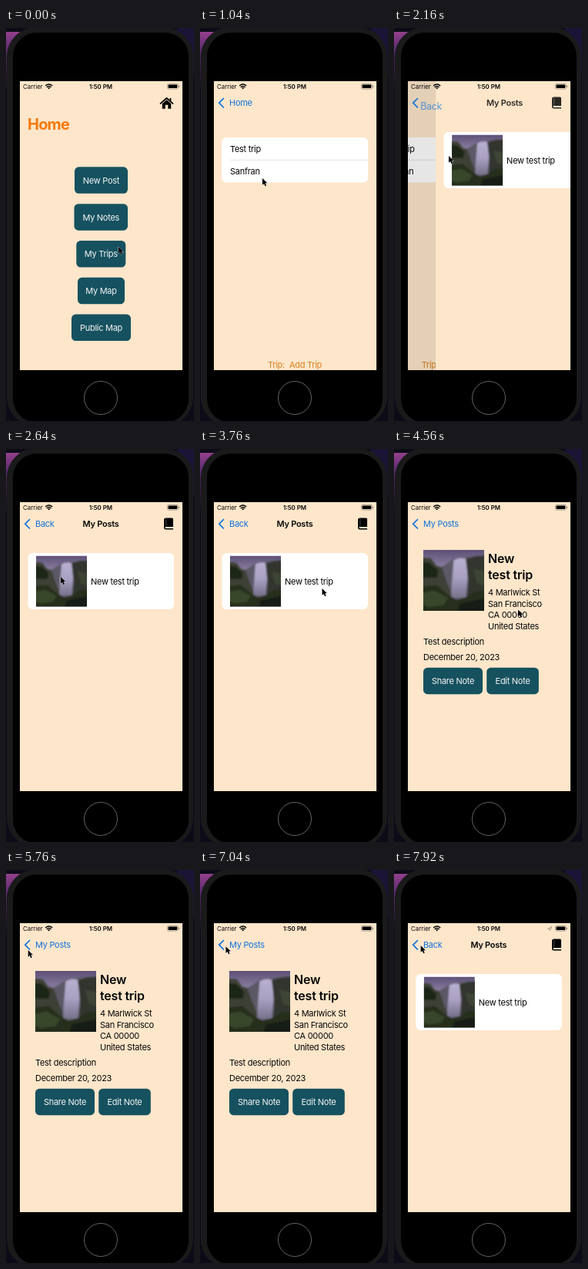
These frames come from a looping animation (244 by 510 pixels, 8 s). An HTML page:

```html
<!DOCTYPE html>
<html lang="en">
<head>
<meta charset="utf-8">
<title>Travel notes</title>
<style>
html, body { margin: 0; width: 100%; height: 100%; overflow: hidden; background: #0d0b18; }
svg { display: block; width: 100%; height: 100%; }
text { font: 11px Inter, "Liberation Sans", sans-serif; letter-spacing: -.28px; fill: #060606; }
.mid { text-anchor: middle; }
.blue { fill: #1172de; }
.amber { fill: #d9821f; }
.white { fill: #f4f6f6; }
.large { font-size: 20px; font-weight: 700; letter-spacing: -.8px; fill: #f57a0b; }
.head { font-size: 16px; font-weight: 600; letter-spacing: -.2px; }
.title { font-weight: 600; text-anchor: middle; }
.status { font-size: 7.9px; letter-spacing: 0; }
.bold { font-weight: 600; }
.card { fill: #fff; }
.bg { fill: #fde6ca; }
</style>
</head>
<body>
<svg viewBox="0 0 244 510">
  <defs>
    <clipPath id="screen"><rect x="18" y="69" width="211" height="375"/></clipPath>
    <linearGradient id="glow" x2="0" y2="1">
      <stop offset="0" stop-color="#94408c"/><stop offset=".3" stop-color="#5c2c70"/><stop offset="1" stop-color="#120e20"/>
    </linearGradient>
    <linearGradient id="sky" x2="0" y2="1">
      <stop offset="0" stop-color="#5d5077"/><stop offset=".25" stop-color="#85799b"/><stop offset=".7" stop-color="#6f6a7d"/><stop offset="1" stop-color="#3a3d35"/>
    </linearGradient>
    <linearGradient id="falls" x2="0" y2="1">
      <stop offset="0" stop-color="#b9b0d0"/><stop offset=".5" stop-color="#a9a0c2"/><stop offset="1" stop-color="#77718a"/>
    </linearGradient>
    <filter id="soft"><feGaussianBlur stdDeviation="1.1"/></filter>
    <symbol id="photo" viewBox="0 0 66 66">
      <rect width="66" height="66" fill="url(#sky)"/>
      <g filter="url(#soft)">
        <path d="M17 20L27 14L34 9L70 5V70H17Z" fill="#5c5866"/>
        <path d="M-4 8L8 9L14 17L20 19L25 34L31 48L34 70H-4Z" fill="#3c4135"/>
        <path d="M-4 13L7 14L16 22L15 30L-4 30Z" fill="#1f2519"/>
        <path d="M33 11Q40 7 47 10L48 30L46 52H30L31 36Z" fill="url(#falls)"/>
        <path d="M46 10L56 7L70 6V70H46L49 34Z" fill="#31342e"/>
        <path d="M54 20L70 24V40L58 36Z" fill="#3d4534"/>
        <path d="M-4 40L14 38L26 48L36 54L47 51L56 45L70 44V70H-4Z" fill="#252d1b"/>
        <path d="M-4 47L12 44L27 52L22 60L6 62L-4 58Z" fill="#38462a"/>
        <path d="M40 58L70 52V70H36Z" fill="#181c12"/>
      </g>
    </symbol>
  </defs>

  <rect width="244" height="510" fill="#0d0b18"/>
  <rect y="5" width="20" height="75" fill="url(#glow)"/>
  <rect x="222" width="22" height="60" fill="#1c1436"/>
  <rect x="1" y="-1" width="242" height="518" rx="38" fill="#1a1a1b"/>
  <rect x="9" y="6" width="228" height="506" rx="31"/>
  <circle cx="123" cy="480" r="21.5" fill="none" stroke="#636363"/>

  <g clip-path="url(#screen)">
    <g id="pages">
      <g>
        <rect class="bg" x="18" y="69" width="211" height="375"/>
        <g id="menu"></g>
      </g>
      <g>
        <rect class="bg" x="18" y="69" width="211" height="375"/>
        <rect class="card" x="28" y="142" width="190" height="58.5" rx="6"/>
        <path d="M39 171.3H218" stroke="#dcdcdc" stroke-width=".8"/>
        <text x="39" y="161">Test trip</text>
        <text x="39" y="190">Sanfran</text>
        <text class="amber" x="88" y="441">Trip:</text>
        <text class="amber" x="116" y="441">Add Trip</text>
      </g>
      <g>
        <rect class="bg" x="18" y="69" width="211" height="375"/>
        <rect class="card" x="28.5" y="135" width="189.5" height="73" rx="6"/>
        <use href="#photo" x="39" y="138.5" width="66" height="66"/>
        <text x="110" y="175.5">New test trip</text>
      </g>
      <g>
        <rect class="bg" x="18" y="69" width="211" height="375"/>
        <use href="#photo" x="38" y="131" width="79" height="79"/>
        <text class="head" x="122" y="148">New</text>
        <text class="head" x="122" y="169">test trip</text>
        <text x="122" y="190.3">4 Marlwick St</text>
        <text x="122" y="205">San Francisco</text>
        <text x="122" y="219.4">CA 00000</text>
        <text x="122" y="234">United States</text>
        <text x="38" y="254">Test description</text>
        <text x="38" y="274">December 20, 2023</text>
        <g id="actions"></g>
      </g>
    </g>

    <path id="chevron" d="M30.5 91.5L24.8 97.2L30.5 103" fill="none" stroke="#1172de" stroke-width="1.7" stroke-linecap="round" stroke-linejoin="round"/>
    <text id="homeLarge" class="large">Home</text>
    <text id="homeLabel" class="blue">Home</text>
    <text id="backLabel" class="blue">Back</text>
    <text id="postsTitle" class="title">My Posts</text>
    <text id="postsLabel" class="blue">My Posts</text>
    <g id="house">
      <path d="M200.5 98L208.5 91L216.5 98" fill="none" stroke="#000" stroke-width="1.7" stroke-linecap="round" stroke-linejoin="round"/>
      <path d="M202.8 98.3L208.5 93.3L214.2 98.3V104.8H210.3V99.8H206.7V104.8H202.8ZM212.5 91H214.3V95L212.5 93.5Z"/>
    </g>
    <g id="book">
      <path d="M207.5 89.5H215.5Q217 89.5 217 91V101H207.5Q206.5 101 206.5 102T207.5 103H217V104.5H207.5Q205 104.5 205 102V92Q205 89.5 207.5 89.5Z"/>
      <path d="M207.8 90.5V100.5" stroke="#777" stroke-width=".6"/>
    </g>

    <text class="status" x="22" y="79">Carrier</text>
    <text class="status bold mid" x="123" y="79">1:50 PM</text>
    <g fill="none" stroke="#000" stroke-width="1.4">
      <path d="M51.2 75Q55.7 70.8 60.2 75M52.8 76.9Q55.7 74.2 58.6 76.9"/>
      <path d="M54.2 77.7Q55.7 76.5 57.2 77.7L55.7 79.4Z" fill="#000" stroke="none"/>
      <rect x="209.4" y="72.4" width="14" height="6.8" rx="1.8" stroke="#8f8577" stroke-width=".7"/>
      <rect x="210.5" y="73.5" width="11.8" height="4.6" rx="1" fill="#000" stroke="none"/>
      <path d="M224.7 74.7V77" stroke="#8f8577" stroke-width="1"/>
      <path id="locate" d="M199.7 76.2L204.8 73.6L202.4 78.8L202.1 76.5Z" stroke="#8d8377" stroke-width=".7"/>
    </g>
  </g>
  <path id="cursor" d="M0 0V10.2L2.4 8L4.1 11.8L5.9 11L4.3 7.3H7.4Z" stroke="#fff" stroke-width=".8" stroke-linejoin="round" paint-order="stroke"/>
</svg>
<script>
const LOOP = 8000, STEP = 80, WIDTH = 211;
const PUSH = [200, 1960, 3880], POP = 7400;
// time, x, y of the pointer tip
const PATH = [
  [0, 146, 284], [400, 146, 284], [1040, 81, 195], [1360, 68, 167], [1520, 68, 167],
  [1600, 71, 166], [2640, 71, 166], [3120, 154, 193], [3280, 154, 193], [3360, 158.5, 181],
  [3920, 158.5, 181], [4560, 161, 208.5], [4640, 161, 208.5], [5440, 28.7, 104], [6640, 28.7, 104], [7200, 34.7, 98]
];

const el = id => document.getElementById(id);
const mix = (a, b, p) => a + (b - a) * p;

function buttons(host, list) {
  el(host).innerHTML = list.map(([label, x, y, w]) =>
    `<rect x="${x}" y="${y}" width="${w}" height="34.5" rx="5.5" fill="#16515f"/>
     <text class="mid white" x="${x + w / 2}" y="${y + 21.3}">${label}</text>`).join("");
}
buttons("menu", [
  ["New Post", 89, 180.3, 69], ["My Notes", 88.5, 228.2, 69.5], ["My Trips", 91.3, 276, 64],
  ["My Map", 93, 323.8, 61], ["Public Map", 85, 371.6, 77]
]);
buttons("actions", [["Share Note", 38, 283.7, 77], ["Edit Note", 120.2, 283.7, 67.6]]);

const pages = [...el("pages").children];
const shades = pages.map(page => {
  const r = page.firstElementChild.cloneNode();
  r.removeAttribute("class");
  page.append(r);
  return r;
});

// critically damped spring from 0 to 1
function spring(ms) {
  const k = Math.max(0, ms) * 0.016;
  return 1 - (1 + k) * Math.exp(-k);
}

function pointer(t) {
  const i = PATH.findIndex(k => k[0] > t);
  if (i < 0) return PATH[PATH.length - 1].slice(1);
  const [t0, x0, y0] = PATH[i - 1], [t1, x1, y1] = PATH[i];
  const u = (t - t0) / (t1 - t0), e = u * u * (3 - 2 * u);
  return [mix(x0, x1, e), mix(y0, y1, e)];
}

function place(id, x, y, opacity, scale = 1) {
  el(id).setAttribute("transform", `translate(${x} ${y}) scale(${scale})`);
  el(id).setAttribute("opacity", opacity);
}

function render(t) {
  const [a, b, push] = PUSH.map(start => spring(t - start));
  const pop = spring(t - POP), c = push * (1 - pop);
  const shown = [1, a, b, c, 0];

  pages.forEach((page, i) => {
    const x = WIDTH * (1 - shown[i]) - 63 * shown[i + 1];
    page.setAttribute("transform", `translate(${x} 0)`);
    shades[i].setAttribute("opacity", 0.12 * shown[i + 1]);
  });

  place("chevron", 0, 0, a);
  place("homeLarge", mix(28, 38, a), mix(132, 101, a), (1 - a) ** 1.5, mix(1, 0.55, a));
  place("homeLabel", mix(28, 38, a) - 30 * b, mix(132, 101, a), a * (1 - b) ** 2, mix(1.8, 1, a));
  place("backLabel", mix(16, 38, b) - 30 * c, mix(132, 101, b), b ** 2 * (1 - c) ** 2, mix(1.8, 1, b));
  place("postsTitle", 123 + 120 * (1 - b) - 61 * c, 101, b * (1 - c));
  place("postsLabel", mix(99, 38, c), 101, c);
  place("house", 0, 0, 1 - a);
  place("book", 0, 0, b * (1 - c));
  place("locate", 0, 0, pop > 0.5 ? 1 : 0);
  place("cursor", ...pointer(t), 1, 0.86);
}

const began = performance.now();
function tick() {
  const t = (performance.now() - began) % LOOP;
  render(Math.floor(t / STEP) * STEP);
  requestAnimationFrame(tick);
}
tick();
</script>
</body>
</html>
```
